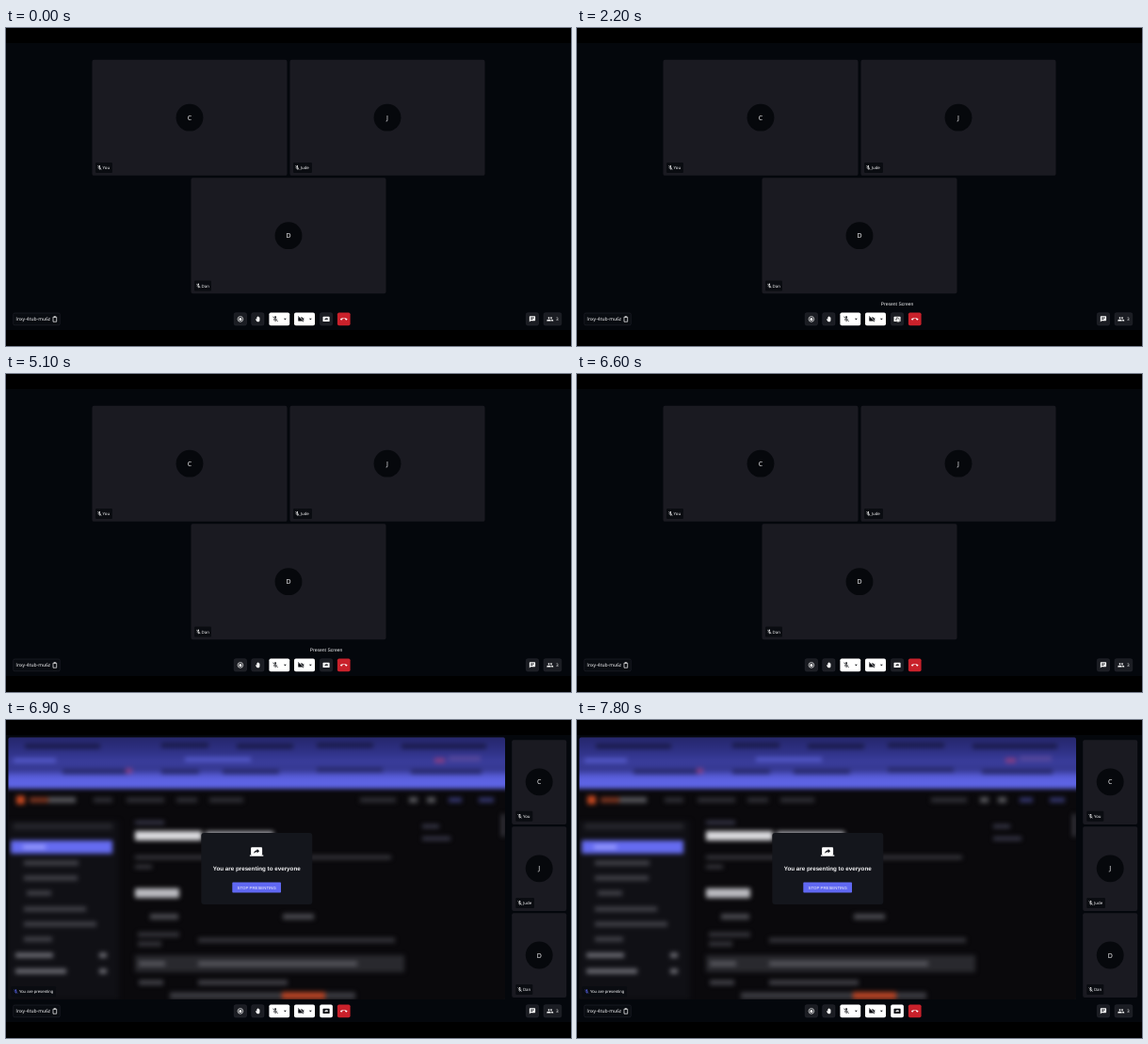
These frames come from a looping animation (600 px wide and 338 px high, 8 s). An HTML page:

```html
<!DOCTYPE html>
<html lang="en">
<head>
<meta charset="utf-8">
<title>Meeting room</title>
<style>
html, body { margin: 0; width: 100%; height: 100%; overflow: hidden; background: #000; }
svg { display: block; width: 100vw; height: 100vh; }
text { font-family: "Noto Sans", sans-serif; fill: #f4f4f6; text-rendering: geometricPrecision; }
.ui { font-family: "Liberation Sans", Arial, sans-serif; }
.mid { text-anchor: middle; }
.name { font-size: 4.375px; }
.initial { font-size: 7px; text-anchor: middle; }
.tile { fill: #1a1a21; }
.dark { fill: #06080c; }
.chip { fill: #0a0c11; }
.btn { fill: #1b1d23; stroke: #30323a; stroke-width: .4; }
.lit { fill: #fff; }
.white { fill: #fff; }
.ink { fill: #0a0c11; }
.line { fill: none; stroke: #fff; }

.grid, .share, .feed, .tip, .cursor { animation: 8s step-end infinite; }
.grid { animation-name: leave; }
.share { animation-name: enter; }
.feed { animation-name: load; }
.tip { animation-name: tip; }
.cursor { animation-name: move; }

@keyframes leave { 0% { visibility: visible } 85%, 100% { visibility: hidden } }
@keyframes enter { 0% { visibility: hidden } 85%, 100% { visibility: visible } }
@keyframes load { 0% { visibility: hidden } 86.25%, 100% { visibility: visible } }
@keyframes tip {
  0% { opacity: 0 }
  8.75% { opacity: 0; animation-timing-function: steps(3) }
  12.5% { opacity: 1 }
  77.5% { opacity: 1; animation-timing-function: steps(4) }
  82.5%, 100% { opacity: 0 }
}
@keyframes move {
  0% { opacity: 0; transform: translate(370px, 251px) }
  3.75% { opacity: 1; transform: translate(370px, 251px); animation-timing-function: steps(4) }
  8.75% { opacity: 1; transform: translate(345px, 294px); animation-timing-function: steps(4) }
  13.75% { opacity: 1; transform: translate(336px, 306px) }
  26.25% { opacity: 1; transform: translate(337px, 306.5px) }
  27.5% { opacity: 1; transform: translate(338px, 306.5px) }
  30% { opacity: 1; transform: translate(337px, 306.2px) }
  31.25% { opacity: 1; transform: translate(336px, 306px) }
  36.25% { opacity: 1; transform: translate(327px, 268px) }
  37.5% { opacity: 1; transform: translate(308px, 206px) }
  38.75% { opacity: 1; transform: translate(300px, 183px) }
  63.75%, 100% { opacity: 0; transform: translate(300px, 183px) }
}
</style>
</head>
<body>
<svg viewBox="0 0 600 338" preserveAspectRatio="none">
  <defs>
    <path id="micOff" d="M19 11h-1.7c0 .74-.16 1.43-.43 2.05l1.23 1.23c.56-.98.9-2.09.9-3.28zm-4.02.17c0-.06.02-.11.02-.17V5c0-1.66-1.34-3-3-3S9 3.34 9 5v.18l5.98 5.99zM4.27 3L3 4.27l6.01 6.01V11c0 1.66 1.33 3 2.99 3 .22 0 .44-.03.65-.08l1.66 1.66c-.71.33-1.5.52-2.31.52-2.76 0-5.3-2.1-5.3-5.1H5c0 3.41 2.72 6.23 6 6.72V21h2v-3.28c.91-.13 1.77-.45 2.54-.9L19.73 21 21 19.73 4.27 3z"/>
    <path id="camOff" d="M21 6.5l-4 4V7c0-.55-.45-1-1-1H9.82L21 17.18V6.5zM3.27 2L2 3.27 4.73 6H4c-.55 0-1 .45-1 1v10c0 .55.45 1 1 1h12c.21 0 .39-.08.54-.18L19.73 21 21 19.73 3.27 2z"/>
    <path id="screen" d="M20 18c1.1 0 2-.9 2-2V6c0-1.1-.9-2-2-2H4c-1.1 0-2 .9-2 2v10c0 1.1.9 2 2 2H0v2h24v-2h-4zm-7-3.5v-2.2c-2.8 0-4.6.85-6 2.7.56-2.67 2.1-5.33 6-5.87V7l4 3.73-4 3.77z"/>
    <path id="present" fill-rule="evenodd" d="M2 3h20c1 0 2 1 2 2v14c0 1-1 2-2 2H2c-1 0-2-1-2-2V5c0-1 1-2 2-2zm5 13h3v-3h4v3l5-4.500-5-4.500v2H9c-1 0-2 1-2 2z"/>
    <path id="hangUp" d="M12 9c-1.6 0-3.15.25-4.6.72v3.1c0 .4-.23.74-.56.9-1 .5-1.9 1.12-2.66 1.85-.4.4-1 .4-1.4 0L.3 13.08c-.4-.4-.4-1 0-1.4C3.34 8.78 7.46 7 12 7s8.66 1.78 11.7 4.67c.4.4.4 1 0 1.4l-2.48 2.5c-.4.4-1 .4-1.4 0-.8-.74-1.7-1.36-2.67-1.85-.33-.16-.56-.5-.56-.9v-3.1C15.15 9.25 13.6 9 12 9z"/>
    <path id="chat" d="M20 2H4c-1.1 0-2 .9-2 2v18l4-4h14c1.1 0 2-.9 2-2V4c0-1.1-.9-2-2-2zM6 9h12v2H6V9zm8 5H6v-2h8v2zm4-6H6V6h12v2z"/>
    <path id="people" d="M16 11a3 3 0 1 0 0-6 3 3 0 0 0 0 6zm-8 0a3 3 0 1 0 0-6 3 3 0 0 0 0 6zm0 2c-2.33 0-7 1.17-7 3.5V19h14v-2.5c0-2.33-4.67-3.5-7-3.5zm8 0c-.3 0-.6.02-1 .05 1.2.84 2 1.97 2 3.45V19h6v-2.5c0-2.33-4.67-3.5-7-3.5z"/>
    <path id="palm" d="M8 13V5.500a1.300 1.300 0 0 1 2.600 0V3.300a1.300 1.300 0 0 1 2.700 0V4.500a1.300 1.300 0 0 1 2.700 0V7a1.300 1.300 0 0 1 2.700 0v9c0 4-2.500 6.500-6 6.500-3 0-4.500-1.500-6-4L3.500 13.200c1.500-1.500 3-1 4.500.800z"/>
    <path id="caret" d="M-1.500-.7h3L0 .9z"/>
    <circle id="avatar" class="dark" r="14.4"/>
    <g id="tag">
      <rect class="chip" y="-5.500" width="18" height="11" rx="1.200"/>
      <use href="#micOff" class="white" transform="translate(1.400 -2.900) scale(.24)"/>
    </g>
    <rect id="bigTile" class="tile" width="207" height="123" rx="1.900"/>
    <rect id="sideTile" class="tile" width="58" height="89.700" rx="1.900"/>
    <linearGradient id="tabs" x2="0" y2="1">
      <stop offset="0" stop-color="#22235f"/>
      <stop offset=".3" stop-color="#2b2d7d"/>
      <stop offset=".55" stop-color="#3a3d9c"/>
      <stop offset=".68" stop-color="#34378e"/>
      <stop offset=".8" stop-color="#5a5fdd"/>
      <stop offset="1" stop-color="#6067ea"/>
    </linearGradient>
    <filter id="blur" x="-5%" y="-5%" width="110%" height="110%" color-interpolation-filters="sRGB"><feGaussianBlur stdDeviation="2.600"/></filter>
    <clipPath id="frame"><rect x="2.500" y="18.500" width="527.500" height="278.500" rx="1.900"/></clipPath>
  </defs>

  <rect width="600" height="338"/>
  <rect y="16" width="600" height="305" fill="#04070c"/>

  <g class="grid">
    <use href="#bigTile" x="91.500" y="33.800"/>
    <use href="#bigTile" x="301.500" y="33.800"/>
    <use href="#bigTile" x="196.500" y="159.200"/>
    <use href="#avatar" x="195" y="95.200"/>
    <use href="#avatar" x="405" y="95.200"/>
    <use href="#avatar" x="300" y="220.700"/>
    <text class="initial" x="195" y="97.700">C</text>
    <text class="initial" x="405" y="97.700">J</text>
    <text class="initial" x="300" y="223.200">D</text>
    <use href="#tag" x="95" y="148.500"/>
    <rect class="chip" x="319" y="143" width="6" height="11" rx="1.200"/>
    <use href="#tag" x="305" y="148.500"/>
    <use href="#tag" x="200" y="274"/>
    <g class="name">
      <text x="102.600" y="150.100">You</text>
      <text x="312.800" y="150.100">Jude</text>
      <text x="207.600" y="275.600">Dan</text>
    </g>
  </g>

  <g class="share">
    <rect class="tile" x="2.500" y="18.500" width="527.500" height="278.500" rx="1.900"/>
    <g class="feed">
      <g clip-path="url(#frame)">
        <rect x="2" y="18" width="529" height="280" fill="#0a090c"/>
        <g filter="url(#blur)" fill="none">
          <rect x="-8" y="10" width="550" height="63" fill="url(#tabs)"/>
          <g stroke-width="5">
            <path stroke="#191a48" d="M20 28h80M165 27h50M245 28h60M330 27h60M420 28h90"/>
            <path stroke="#5358c8" d="M8 43h45M190 42h70"/>
            <path stroke="#262868" d="M60 55h70M165 55h40M230 55h60M330 53h70M430 55h75"/>
            <path stroke="#8b3d82" d="M455 43h11M127 54h7"/>
            <path stroke="#58489c" d="M470 41h34"/>
          </g>
          <path stroke="#101015" stroke-width="190" d="M0 202h120"/>
          <path stroke="#c54820" stroke-width="9" d="M11 85h9"/>
          <path stroke="#77331f" stroke-width="6" d="M25 85h20"/>
          <path stroke="#55555a" stroke-width="6" d="M45 85h29M428 85h9M447 85h9"/>
          <path stroke="#303036" stroke-width="5" d="M93 85h20M128 85h40M181 85h22M216 85h36M376 85h38"/>
          <path stroke="#34376f" stroke-width="5" d="M470 85h14M502 85h16"/>
          <path stroke="#25252b" stroke-width="7" d="M8 113h105"/>
          <path stroke="#656bf0" stroke-width="14" d="M5 135h108"/>
          <path stroke="#aeb0ff" stroke-width="3" d="M18 135h24"/>
          <path stroke="#43434a" stroke-width="5" d="M19 152h58M19 168h57M22 184h26M19 201h66M19 217h77M19 233h30"/>
          <path stroke="#707078" stroke-width="5" d="M10 250h40M10 267h54M99 250h8M99 267h8"/>
          <path stroke="#39394a" stroke-width="4" d="M137 109h31M442 113h18M442 126h30"/>
          <path stroke="#dcdce0" stroke-width="10" d="M137 123h71"/>
          <path stroke="#b4b4ba" stroke-width="9" d="M212 123h72"/>
          <path stroke="#39393f" stroke-width="4" d="M137 146h272M137 156h18"/>
          <path stroke="#bcbcc1" stroke-width="10" d="M137 184h47"/>
          <path stroke="#49494f" stroke-width="6" d="M153 209h30M294 209h33"/>
          <path stroke="#35353b" stroke-width="5" d="M140 228h44M140 238h25M204 234h209"/>
          <path stroke="#29292e" stroke-width="18" d="M137 259h286"/>
          <path stroke="#58585f" stroke-width="5" d="M141 259h28M204 259h169"/>
          <path stroke="#44444b" stroke-width="5" d="M141 279h26M204 279h95"/>
          <path stroke="#3c3c42" stroke-width="7" d="M174 293h197"/>
          <path stroke="#b54425" stroke-width="8" d="M293 293h46"/>
          <path stroke="#3b3b42" stroke-width="4" d="M528 100v24"/>
        </g>
      </g>
      <rect x="207.300" y="120" width="118" height="76" rx="3" fill="#14161c"/>
    </g>
    <use href="#screen" class="white" transform="translate(258.900 132.800) scale(.6)"/>
    <text class="ui mid" x="266.200" y="159.600" font-size="6.250" font-weight="700">You are presenting to everyone</text>
    <rect x="240.300" y="172.600" width="51.700" height="11" rx=".8" fill="#6068f2"/>
    <text class="ui mid" x="266.200" y="179.700" font-size="4.375">STOP PRESENTING</text>

    <rect class="chip" x="5.300" y="283" width="47.700" height="11.200" rx="1.200"/>
    <use href="#micOff" fill="#5965ec" transform="translate(7.500 285.700) scale(.24)"/>
    <text class="ui name" x="13.700" y="290.200">You are presenting</text>

    <use href="#sideTile" x="537.200" y="21.300"/>
    <use href="#sideTile" x="537.200" y="113.200"/>
    <use href="#sideTile" x="537.200" y="205.300"/>
    <use href="#avatar" x="566.200" y="65.800"/>
    <use href="#avatar" x="566.200" y="157.800"/>
    <use href="#avatar" x="566.200" y="250"/>
    <text class="initial" x="566.200" y="68.300">C</text>
    <text class="initial" x="566.200" y="160.300">J</text>
    <text class="initial" x="566.200" y="252.500">D</text>
    <use href="#tag" x="541.300" y="102.300"/>
    <rect class="chip" x="555" y="189" width="6" height="11" rx="1.200"/>
    <use href="#tag" x="541.300" y="194.500"/>
    <use href="#tag" x="541.300" y="286.500"/>
    <g class="name">
      <text x="548.900" y="103.900">You</text>
      <text x="549.100" y="196.100">Jude</text>
      <text x="548.900" y="288.100">Dan</text>
    </g>
  </g>

  <rect class="btn" x="7.700" y="303" width="49.600" height="12.800" rx="1.500" style="fill:#090c11"/>
  <text x="10.600" y="311.200" font-size="5">lnxy-4tub-mu6z</text>
  <path class="line" stroke-width=".7" d="M50 307.200h3.700v5h-3.700z"/>
  <path class="line" stroke-width="1.100" d="M50.900 307h1.900"/>

  <rect class="btn" x="242.200" y="302.700" width="13.300" height="13.300" rx="1.800"/>
  <circle class="line" cx="248.900" cy="309.400" r="2.800" stroke-width=".7"/>
  <circle class="white" cx="248.900" cy="309.400" r="1.500"/>
  <rect class="btn" x="260.700" y="302.700" width="13.300" height="13.300" rx="1.800"/>
  <use href="#palm" class="white" transform="translate(264 305.800) scale(.29)"/>

  <rect class="lit" x="279.400" y="302.500" width="21.800" height="13.700" rx="1.800"/>
  <use href="#micOff" class="ink" transform="translate(282.300 305.600) scale(.3125)"/>
  <use href="#caret" class="ink" x="296.400" y="309.400"/>
  <rect class="lit" x="306" y="302.500" width="22" height="13.700" rx="1.800"/>
  <use href="#camOff" class="ink" transform="translate(309.300 305.600) scale(.33)"/>
  <use href="#caret" class="ink" x="323.300" y="309.400"/>

  <g class="grid">
    <rect class="btn" x="333.400" y="302.700" width="13.300" height="13.300" rx="1.800"/>
    <use href="#present" class="white" transform="translate(336.500 305.800) scale(.296)"/>
  </g>
  <g class="share">
    <rect class="lit" x="333.200" y="302.500" width="13.700" height="13.700" rx="1.800"/>
    <use href="#present" class="ink" transform="translate(336.500 305.800) scale(.296)"/>
  </g>

  <rect x="351.900" y="302.500" width="13.700" height="13.700" rx="1.800" fill="#c9212b"/>
  <use href="#hangUp" class="white" transform="translate(355 305.700) scale(.3125)"/>

  <rect class="btn" x="552.300" y="302.700" width="13.300" height="13.300" rx="1.800"/>
  <use href="#chat" class="white" transform="translate(555.200 305.600) scale(.3125)"/>
  <rect class="btn" x="571" y="302.700" width="18.800" height="13.300" rx="1.800"/>
  <use href="#people" class="white" transform="translate(574 305.600) scale(.3125)"/>
  <text x="584" y="311.100" font-size="4.700">3</text>

  <g class="tip">
    <text class="ui mid" x="340" y="294.900" font-size="5">Present Screen</text>
  </g>
  <g class="cursor">
    <path fill="#fff" stroke="#111" stroke-width=".35" d="M1.500 3.400V.8a.6.600 0 0 1 1.200 0v1.600l1.600.4q.7.200.6 1L4.500 6H2L.4 4q-.3-.8.5-.8z"/>
  </g>
</svg>
</body>
</html>
```
